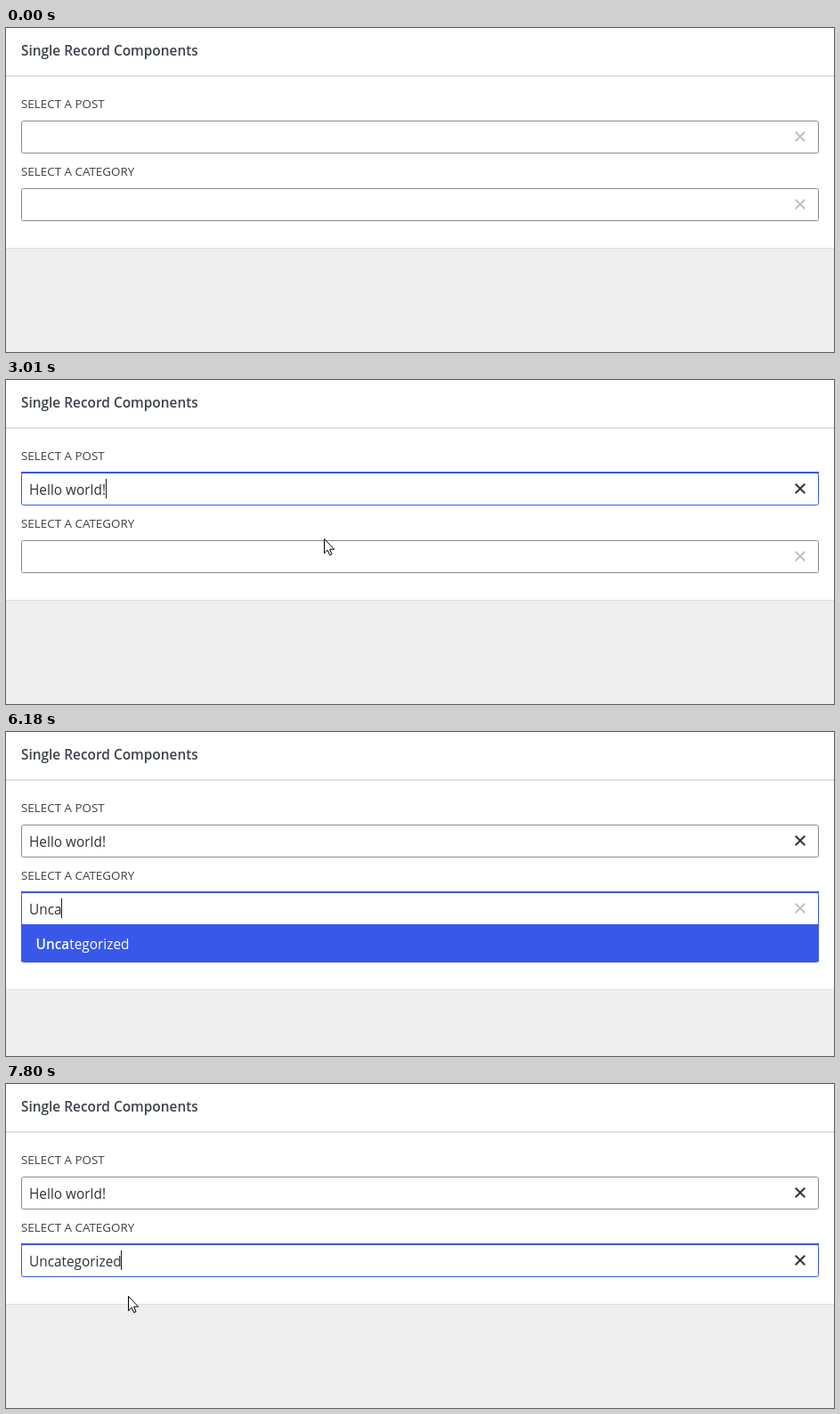
Recreate the animation shown at these times as an HTML page with a canvas. Size 930x364 px, loop 8 s.

```html
<!DOCTYPE html>
<html lang="en">
<head>
<meta charset="utf-8">
<title>Single Record Components</title>
<style>
  html, body { margin: 0; width: 100%; height: 100%; overflow: hidden; background: #fff; }
  canvas { display: block; }
</style>
</head>
<body>
<canvas id="stage" width="930" height="364"></canvas>
<script>
const ctx = document.getElementById('stage').getContext('2d', { alpha: false });
const LOOP = 8000, STEP = 70, BLINK = 530;
const BLUE = '#3858e9', INK = '#3c434a', DARK = '#2c3338';
const LEFT = 17, WIDTH = 896, FIELD_H = 37, ROW_H = 42;

// Pointer path: time, x, y
const path = [
  [330, 651, 212], [1100, 518, 126], [1780, 518, 126], [2200, 355, 171],
  [2480, 357, 178], [3340, 357, 178], [3620, 257, 212], [4340, 257, 212],
  [5040, 197, 239], [7240, 197, 239], [7520, 137, 238]
];
const clicks = [[1170, 1450], [2810, 3010], [3690, 3900], [7590, 7800]];
const caretResets = [1380, 2940, 3830, 5580, 6050, 7730];

const arrow = new Path2D('M.5 .5V16.7L4.2 13.2L6.6 18.7L9 17.7L6.6 12.2H11.6Z');
const hand = new Path2D('M-1.5 14.5V2Q-1.5 .5 0 .5T1.7 2V8Q3.5 7 4.8 9Q6.8 8 7.8 10Q10.5 9 10.8 12V16' +
  'Q10.5 19 9 20.5V23.5H0V21Q-3 17-5.5 14Q-6.5 12-4.5 11.7Q-3 11.7-1.5 14.5Z');
const knuckles = new Path2D('M1.7 8V13M4.8 9.5V13M7.8 10.5V13');
const beam = new Path2D('M-3 -7.5H0M1 -7.5H4M.5 -7V8M-3 8.5H0M1 8.5H4');

const within = (t, a, b) => t >= a && t < b;

function rect(x, y, w, h, color) {
  ctx.fillStyle = color;
  ctx.fillRect(x, y, w, h);
}

// Draws text and returns the x where it ends
function text(str, x, y, color = INK, size = 15.4, weight = 400) {
  ctx.font = `${weight} ${size}px "Open Sans", sans-serif`;
  ctx.fillStyle = color;
  ctx.fillText(str, x, y);
  return x + ctx.measureText(str).width;
}

function outline(y, h, color) {
  ctx.strokeStyle = color;
  ctx.lineWidth = 1;
  ctx.beginPath();
  ctx.roundRect(LEFT + .5, y + .5, WIDTH - 1, h - 1, 2);
  ctx.stroke();
}

function field({ y, label, value, filled, focused, fading, caret, rows, query }) {
  text(label, LEFT, y - 14, INK, 13.4);
  outline(y, FIELD_H, focused ? BLUE : '#8c8c8c');
  if (focused && !fading) rect(LEFT, y - 1, WIDTH, 2, BLUE);

  const end = text(value, 26, y + 25, DARK);
  if (caret) rect(Math.floor(end), y + 7, 1, 22, fading ? BLUE : '#1e1e1e');

  ctx.strokeStyle = filled ? '#32373c' : '#bfc1c3';
  ctx.lineWidth = 2;
  ctx.beginPath();
  for (const d of [-5.3, 5.3]) {
    ctx.moveTo(892 + d, y + 12.7);
    ctx.lineTo(892 - d, y + 23.3);
  }
  ctx.stroke();

  if (!rows.length) return;
  const top = y + 36;
  rect(LEFT, top, WIDTH, ROW_H, BLUE);
  outline(top, rows.length * ROW_H + 1, BLUE);
  rows.forEach((row, i) => {
    const baseline = top + i * ROW_H + 28, color = i ? DARK : '#fff';
    const x = text(row.slice(0, query), 33.5, baseline, color, 15.4, 600);
    text(row.slice(query), x, baseline, color);
  });
}

function pointerAt(t) {
  const i = path.findLastIndex(key => key[0] <= t);
  const [t0, x0, y0] = path[i], [t1, x1, y1] = path[i + 1] || [LOOP, x0, y0];
  const p = Math.floor((t - t0) / STEP) * STEP / (t1 - t0);
  const e = p * p * (3 - 2 * p);
  return [Math.round(x0 + (x1 - x0) * e), Math.round(y0 + (y1 - y0) * e)];
}

function pointer(t, fields) {
  if (t < path[0][0] || within(t, 5580, 7310)) return;
  const [x, y] = pointerAt(t);
  const overField = fields.some(f => within(y, f.y, f.y + 36));
  const overList = fields.some(f => within(y, f.y + 36, f.y + 37 + f.rows.length * ROW_H) && f.rows.length);

  if (clicks.some(([a, b]) => within(t, a, b))) {
    const released = fields.some(f => f.fading);
    ctx.fillStyle = released ? 'rgba(255,232,0,.55)' : 'rgba(255,255,0,.5)';
    ctx.beginPath();
    ctx.arc(x - 2, y - 1, 15, 0, 7);
    ctx.fill();
  }

  ctx.save();
  ctx.translate(x, y);
  ctx.lineWidth = 1;
  ctx.strokeStyle = '#000';
  if (overField) {
    ctx.stroke(beam);
  } else {
    const shape = overList ? hand : arrow;
    ctx.fillStyle = '#fff';
    ctx.fill(shape);
    ctx.stroke(shape);
    if (overList) ctx.stroke(knuckles);
  }
  ctx.restore();
}

function draw(t) {
  const postOpen = within(t, 1380, 2940);
  const categoryOpen = within(t, 3830, 7730) && !within(t, 6440, 6510);
  const postFilled = t >= 2940, categoryFilled = t >= 7730;
  const typed = t < 5580 ? 0 : Math.min(4, 1 + Math.floor((t - 5580) / 200));
  const reset = caretResets.findLast(r => r <= t);
  const caret = reset !== undefined && Math.floor((t - reset) / BLINK) % 2 === 0;
  const postFocus = within(t, 1380, 3830), categoryFocus = t >= 3830;

  const post = {
    y: 104, label: 'SELECT A POST', value: postFilled ? 'Hello world!' : '',
    filled: postFilled, focused: postFocus, fading: within(t, 1380, 1450),
    caret: postFocus && caret, rows: postOpen ? ['Hello world!', 'Test Post 2'] : [], query: 0
  };
  const category = {
    y: 180 + post.rows.length * ROW_H, label: 'SELECT A CATEGORY',
    value: 'Uncategorized'.slice(0, categoryFilled ? 13 : typed),
    filled: categoryFilled, focused: categoryFocus, fading: within(t, 3830, 3900),
    caret: categoryFocus && caret, rows: categoryOpen ? ['Uncategorized'] : [], query: typed
  };
  const bottom = category.y + 67 + category.rows.length * ROW_H;

  rect(0, 0, 930, 364, '#fff');
  text('Single Record Components', LEFT, 31, INK, 15.4, 600);
  rect(0, 53, 930, 2, '#dfdfdf');
  rect(0, bottom, 930, 364 - bottom, '#efefef');
  rect(0, bottom, 930, 1, '#dedede');
  field(post);
  field(category);
  pointer(t, [post, category]);
}

const start = performance.now();
function frame() {
  draw((performance.now() - start) % LOOP);
  requestAnimationFrame(frame);
}
frame();
</script>
</body>
</html>
```
